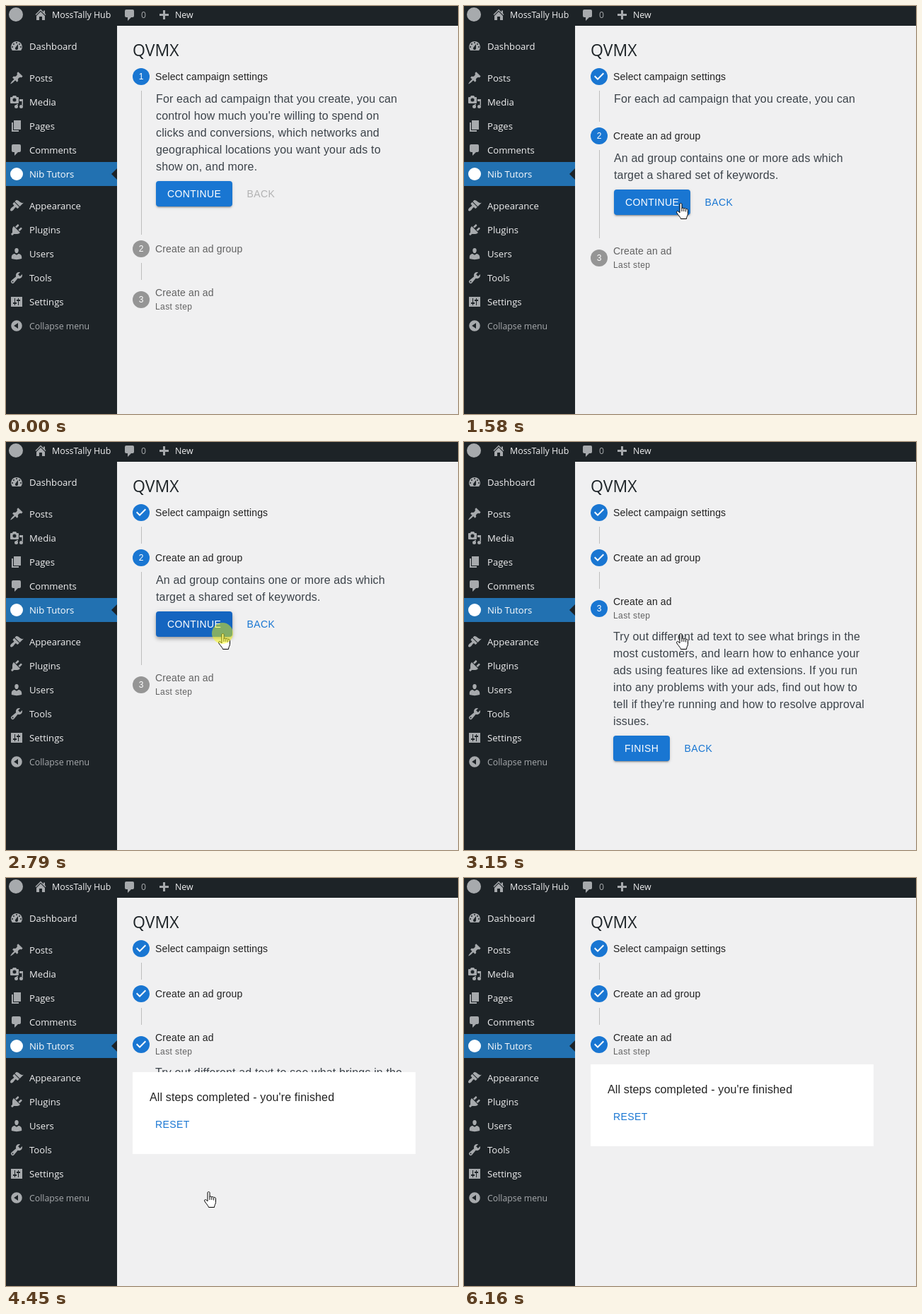
Recreate the animation shown at these times as an HTML page. Size 639 px wide and 578 px high, loop 6.7 s.

```html
<!DOCTYPE html>
<html lang="en">
<head>
<meta charset="utf-8">
<title>Stepper demo</title>
<style>
html, body { margin: 0; width: 100%; height: 100%; overflow: hidden; background: #f0f0f1; }
body { position: relative; font: 16px/24px "Liberation Sans", Arial, sans-serif; letter-spacing: .15px; color: #3c434a; }
#chrome, #pointer { position: absolute; left: 0; top: 0; }
#chrome text { font-family: "Open Sans", "Noto Sans", sans-serif; letter-spacing: 0; }
#stepper { position: absolute; left: 179px; top: 80px; width: 400px; white-space: pre; }
.label { display: flex; align-items: center; padding: 8px 0; font-size: 14px; line-height: 20px; color: #0009; }
.label svg { margin-right: 8px; fill: #00000061; }
.label svg text { font-size: 12px; fill: #fff; letter-spacing: 0; }
.label small { display: block; font-size: 12px; letter-spacing: .4px; color: #0009; }
.active .label, .done .label { color: #000000de; }
.active svg, .done svg { fill: #1976d2; }
.check, .done .number { display: none; }
.done .check { display: inline; }
.content, .link { margin-left: 12px; border-left: 1px solid #bdbdbd; }
.content { padding-left: 20px; overflow: hidden; }
.link { height: 24px; }
.step:nth-child(3) .content { border: 0; }
.step:nth-child(3) .link { display: none; }
.row { display: flex; padding-top: 8px; }
.btn {
  --h: 0; box-sizing: border-box; min-width: 64px; height: 36px; margin-right: 8px; padding: 6px 8px;
  border-radius: 4px; text-align: center; font-size: 14px; letter-spacing: .4px; color: #1976d2;
  background: rgb(25 118 210 / calc(.04 * var(--h)));
}
.main {
  padding: 6px 16px; color: #fff;
  background: color-mix(in srgb, #1565c0 calc(100% * var(--h)), #1976d2);
  box-shadow:
    0 calc(3px - 1px * var(--h)) calc(1px + 3px * var(--h)) calc(1px * var(--h) - 2px) #0003,
    0 calc(2px + 2px * var(--h)) calc(2px + 3px * var(--h)) #00000024,
    0 1px calc(5px + 5px * var(--h)) #0000001f;
}
.off { color: #00000042; }
#paper { height: 68px; padding: 24px; box-sizing: content-box; width: 352px; background: #fff; color: #000000de; }
</style>
</head>
<body>
<svg id="chrome" width="639" height="578"></svg>
<div id="stepper"></div>
<svg id="pointer" width="639" height="578">
  <g id="cursor" fill="#fff" stroke="#000">
    <path id="arrow" d="M.5.5v16l3.7-3.5 2.5 5.6 2.6-1.1-2.5-5.5h5z"/>
    <g id="hand" transform="translate(-6)">
      <path d="M6.5.5C7.5.5 8 1.2 8 2v5.5c.5-.8 2.5-.6 2.9.5.6-.8 2.5-.5 2.8.6.8-.6 2.8-.2 2.8 1.6v5.3c0 2-2 4-2 7h-8c0-2-5.8-7.5-6-9.5 0-1.8 2.5-2 4.5.9V2c0-.8.5-1.5 1.5-1.5z"/>
      <path d="M8 7v5M10.9 8v4M13.7 9v3.5"/>
    </g>
    <path id="ibeam" fill="none" d="M-2.5-7.5h2l1 1 1-1h2M.5-6.5v14M-2.5 8.5h2l1-1 1 1h2"/>
  </g>
  <circle id="press" r="15" fill="#ff0" fill-opacity=".47"/>
</svg>
<script>
const LOOP = 6700;
const $ = id => document.getElementById(id);

// Admin bar and side menu
const GREY = '#a7aaad', LIGHT = '#f0f0f1';
const dot = (x, y, r) => `M${x - r} ${y}a${r} ${r} 0 1 0 ${2 * r} 0a${r} ${r} 0 1 0 ${-2 * r} 0z`;
const icons = {
  gauge: 'M3.8 16h12.4a8 8 0 1 0-12.4 0zM8.6 11.6L12 7v6a2 2 0 1 1-3.4-1.4z' +
    dot(10, 5, 1) + dot(6, 7, 1) + dot(14, 7, 1) + dot(4, 11, 1) + dot(16, 11, 1),
  pin: 'M10.4 3l1.8-1.8 6.4 6.4-1.8 1.8c-1-.7-2.5-.6-3.4.3l-.8.8c-.9.9-1 2.3-.3 3.4l-1.8 1.8-2.4-2.4-2.8 2.8c-.5.4-3.4 2.7-3.8 2.3s1.8-3.4 2.2-3.8l2.8-2.8-2.4-2.4 1.8-1.8c1 .7 2.5.5 3.4-.4l.7-.7c1-.9 1.1-2.4.4-3.4z',
  media: 'M13 11V4a1 1 0 0 0-1-1h-1.7L9 1H5L3.7 3H2a1 1 0 0 0-1 1v7a1 1 0 0 0 1 1h10a1 1 0 0 0 1-1zM14 6h5v9h-1.5V9H14zM10 13h2v1.3h-2z' +
    dot(7, 7, 2.5) + dot(16.5, 16.5, 2.5) + dot(9.5, 16.5, 2.5),
  page: 'M6 15V2h10v13zM5 16h8v2H3V5h2z',
  bubble: 'M5 2h9a2 2 0 0 1 2 2v7a2 2 0 0 1-2 2h-2l-5 5v-5H5a2 2 0 0 1-2-2V4a2 2 0 0 1 2-2z',
  brush: 'M14.5 11.1L7.4 4l1.5-1.5c.5-.6 2.3-.5 3.5.3s1.4 1.3 2.9 2.1c1.2.6 2.5 1.3 4.5.9zM13.8 11.8L6.7 4.7 4.9 6.5c-.4.4-.4 1 0 1.4L6 8.9c.4.4.4 1 0 1.4-.9.9-2.2 1.6-3.2 2.5-1.4 1.4-2.4 3.3-1.4 4.3s2.8 0 4.2-1.4c.9-1 1.6-2.3 2.5-3.2.4-.4 1-.4 1.4 0l1.1 1.1c.4.4 1 .4 1.4 0z',
  plug: 'M13.1 4.4L9.9 7.6 8 5.7l3.2-3.2c1-.8 2.7.9 1.9 1.9zM5.1 6.1L6 5l9 9-1.2.9c-.7.7-2.6 1.1-3.8 1.1H6.1l-1.2 1.3a1.5 1.5 0 0 1-2.1-2.2L4 13.9V10c0-1.1.4-3.2 1.1-3.9zm7.3 4l3.2-3.2c1-.8 2.7.9 1.9 1.9L14.2 12z',
  user: 'M10 9.3C7.7 9.3 7.3 5.8 7.3 5.8 7 4 7.8 2 10 2s3 2 2.7 3.8c0 0-.4 3.5-2.7 3.5zm0 2.5l2.7-1.8c2.4 0 4.5 2.3 4.5 4.5V17a24 24 0 0 1-14.4 0v-2.5c0-2.3 1.9-4.5 4.4-4.5z',
  wrench: 'M16.7 9.8c-1.3 1.3-3.3 1.7-5 1l-5.4 6.5a2.5 2.5 0 0 1-3.6-3.6l6.5-5.4c-.6-1.7-.3-3.6 1-5 1.3-1.2 3.2-1.6 4.8-1l-2.9 2.9L14.9 8l2.9-2.9c.5 1.6.1 3.4-1.1 4.7z' + dot(4.5, 15.5, 1),
  sliders: 'M2 3h16v14H2zM7 5h1v6h2v2H8v2H7v-2H5v-2h2zM12 5h1v2h2v2h-2v6h-1V9h-2V7h2z',
  fold: dot(10, 10, 7.8) + 'M12 13.9V6.1L6.2 10z',
  home: 'M16 8.5l1.5 1.5-1 1.1L10 4.6l-6.5 6.5-1-1.1L10 2.5l4 4v-2h2zM10 6l6 6v6h-4v-5H8v5H4v-6z',
  plus: 'M17 7v3h-5v5H9v-5H4V7h5V2h3v5z',
  badge: dot(10, 10, 9)
};
const icon = (name, x, y, fill = GREY) =>
  `<path transform="translate(${x} ${y})" fill="${fill}" fill-rule="evenodd" d="${icons[name]}"/>`;
const text = (str, x, y, size, fill = LIGHT) =>
  `<text x="${x}" y="${y}" font-size="${size}" fill="${fill}">${str}</text>`;
const menu = [
  ['Dashboard', 'gauge', 57], ['Posts', 'pin', 102], ['Media', 'media', 136], ['Pages', 'page', 170],
  ['Comments', 'bubble', 204], ['Nib Tutors', 'badge', 238, '#fff'], ['Appearance', 'brush', 283],
  ['Plugins', 'plug', 317], ['Users', 'user', 351], ['Tools', 'wrench', 385], ['Settings', 'sliders', 419]
];
$('chrome').innerHTML =
  '<path fill="#1d2327" d="M0 0h639v28H157v550H0z"/>' +
  '<path fill="#2271b1" d="M0 221h157v9l-8 8 8 8v9H0z"/>' +
  `<circle cx="14" cy="12" r="10" fill="${GREY}"/>` +
  icon('home', 39, 2) + text('MossTally Hub', 65, 17, 12.4) +
  icon('bubble', 165, 3) + text('0', 191, 17, 12.2, GREY) +
  icon('plus', 213, 4) + text('New', 239, 17, 12.4) +
  menu.map(([name, pic, y, fill]) => icon(pic, 5, y - 10, fill) + text(name, 33, y + 5, 13.1, fill)).join('') +
  icon('fold', 5, 443) + text('Collapse menu', 33, 458, 12.3, GREY) +
  text('QVMX', 179, 71, 23, '#1d2327');

// Stepper
const steps = [
  { name: 'Select campaign settings', main: 'CONTINUE', height: 180, hover: 920, body:
`For each ad campaign that you create, you can
control how much you're willing to spend on
clicks and conversions, which networks and
geographical locations you want your ads to
show on, and more.` },
  { name: 'Create an ad group', main: 'CONTINUE', height: 108, hover: 2120, body:
`An ad group contains one or more ads which
target a shared set of keywords.` },
  { name: 'Create an ad<small>Last step</small>', main: 'FINISH', height: 204, hover: 3540, body:
`Try out different ad text to see what brings in the
most customers, and learn how to enhance your
ads using features like ad extensions. If you run
into any problems with your ads, find out how to
tell if they're running and how to resolve approval
issues.` }
];
$('stepper').innerHTML = steps.map((s, i) =>
  `<div class="step"><div class="label"><svg width="24" height="24"><circle cx="12" cy="12" r="12"/>` +
  `<text class="number" x="12" y="16.3" text-anchor="middle">${i + 1}</text>` +
  `<path class="check" fill="#fff" d="M10 17l-5-5 1.4-1.4 3.6 3.6 7.6-7.6L19 8z"/></svg><div>${s.name}</div></div>` +
  `<div class="content">${s.body}<div class="row"><div class="btn main">${s.main}</div>` +
  `<div class="btn ${i ? '' : 'off'}">BACK</div></div></div><div class="link"></div></div>`
).join('') +
  `<div id="paper">All steps completed - you're finished<div class="row"><div class="btn" id="reset">RESET</div></div></div>`;
document.querySelectorAll('.step').forEach((el, i) => Object.assign(steps[i], {
  el, content: el.querySelector('.content'), button: el.querySelector('.main')
}));

// Timeline: presses are [down, up]; path points are [time, x, y, new cursor]
const presses = [[1335, 1412], [2785, 2855], [4105, 4249]];
const path = [
  [390, 500, 546, 'arrow'], [460, 455, 480], [600, 372, 372], [740, 326, 306], [880, 309, 284],
  [950, 306, 279, 'hand'], [2030, 306, 279], [2110, 306, 275], [2250, 306, 271],
  [3220, 306, 271, 'ibeam'], [3420, 293, 354], [3510, 290, 408, 'arrow'], [3540, 289, 418, 'hand'],
  [3700, 286, 444], [4720, 286, 444, 'arrow'], [4780, 285, 436], [4990, 264, 378],
  [5130, 253, 354, 'hand'], [5410, 250, 342], [5820, 250, 342], [5850, 251, 357, 'arrow'],
  [5880, 253, 368], [5950, 288, 458], [6020, 486, 550], [6090, 532, 566], [6160, 560, 580]
];

// cubic-bezier(.4, 0, .2, 1)
function ease(p) {
  if (p <= 0) return 0;
  if (p >= 1) return 1;
  let lo = 0, hi = 1, s;
  for (let i = 0; i < 20; i++) {
    s = (lo + hi) / 2;
    const x = 1.2 * (1 - s) ** 2 * s + .6 * (1 - s) * s * s + s ** 3;
    if (x < p) lo = s; else hi = s;
  }
  return s * s * (3 - 2 * s);
}
function collapseTime(height) {
  const c = height / 36;
  return (4 + 15 * c ** .25 + c / 5) * 10;
}

function drawSteps(t) {
  const active = presses.filter(p => t >= p[1]).length;
  steps.forEach((s, i) => {
    const run = click => ease((t - click) / collapseTime(s.height));
    const open = (i ? run(presses[i - 1][1]) : 1) * (1 - run(presses[i][1]));
    s.el.className = 'step ' + (i < active ? 'done' : i === active ? 'active' : '');
    s.content.style.height = s.height * open + 'px';
    s.button.style.setProperty('--h', ease((t - s.hover) / 250));
  });
  $('paper').style.display = active > 2 ? '' : 'none';
  $('reset').style.setProperty('--h', ease((t - 5130) / 250) - ease((t - 5850) / 250));
}

function drawPointer(t) {
  const next = path.findIndex(k => k[0] > t);
  $('pointer').style.display = next > 0 ? '' : 'none';
  if (next < 1) return;
  const [t0, x0, y0] = path[next - 1], [t1, x1, y1] = path[next];
  const p = (t - t0) / (t1 - t0);
  const place = `translate(${Math.round(x0 + (x1 - x0) * p)} ${Math.round(y0 + (y1 - y0) * p)})`;
  const kind = path.slice(0, next).reduce((last, k) => k[3] || last, '');
  for (const id of ['arrow', 'hand', 'ibeam']) $(id).style.display = id === kind ? '' : 'none';
  $('cursor').setAttribute('transform', place);
  $('press').setAttribute('transform', place);
  $('press').style.display = presses.some(([down, up]) => t >= down && t < up) ? '' : 'none';
}

function frame(now) {
  const t = now % LOOP;
  drawSteps(t);
  drawPointer(t);
  requestAnimationFrame(frame);
}
const start = performance.now();
requestAnimationFrame(function tick() {
  frame(Math.max(0, performance.now() - start));
});
</script>
</body>
</html>
```
